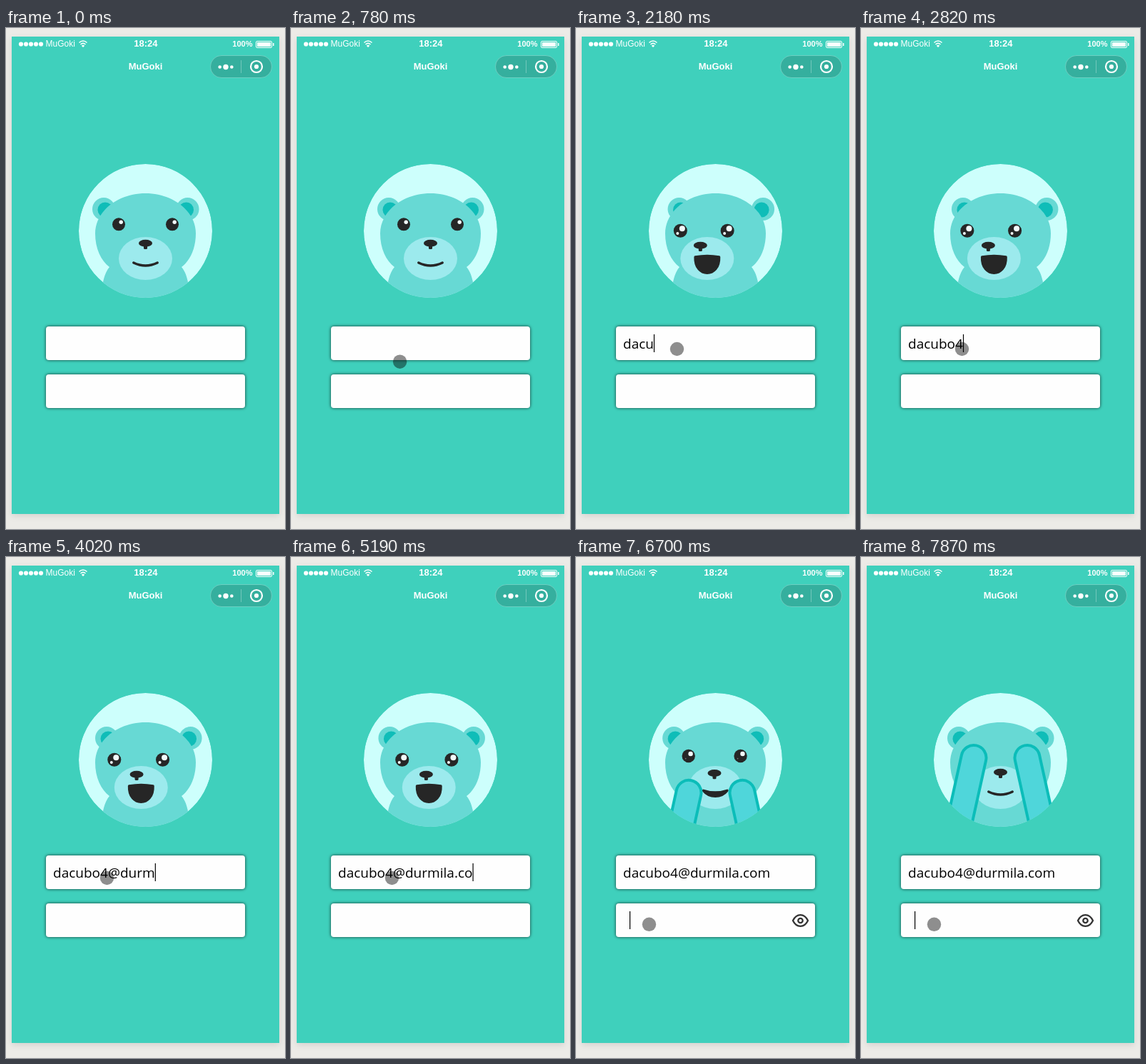
An HTML page for the animation above (8000 ms loop, 391x700 px).

```html
<!DOCTYPE html>
<html lang="en">
<head>
<meta charset="utf-8">
<title>Bear login</title>
<style>
  html, body { margin: 0; width: 100%; height: 100%; overflow: hidden; background: #ecebe7; }
  svg { display: block; width: 391px; height: 700px; }
  .phone { fill: #3fd0bc; filter: drop-shadow(0 3px 4px rgba(0, 0, 0, .1)); }
  .bar { fill: #fff; font: 12px "Liberation Sans", Arial, sans-serif; }
  .bold { font-weight: bold; }
  .line { fill: none; stroke: #fff; }
  .field { fill: #fefefe; filter: drop-shadow(0 0 2px rgba(0, 0, 0, .75)); }
  .fur { fill: #67d9d4; }
  .inner { fill: #0fbdb8; }
  .dark { fill: #262626; }
  .arm { fill: #4fd6da; stroke: #0bbdb9; stroke-width: 4; }
  .icon { fill: none; stroke: #333; stroke-width: 2.3; }
  #email { font: 19px "Open Sans", "Noto Sans", sans-serif; fill: #000; }
</style>
</head>
<body>
<svg viewBox="0 0 391 700">
  <defs>
    <clipPath id="badge"><circle cx="195.5" cy="283.5" r="93.5"/></clipPath>
    <g id="ear">
      <circle class="fur" cx="137" cy="253" r="16"/>
      <circle class="inner" cx="139" cy="254" r="10.5"/>
    </g>
    <rect id="arm" class="arm" x="-17.5" y="-17.5" width="35" height="190" rx="17.5"
          transform="translate(158 280.5) rotate(12.5)"/>
  </defs>

  <rect class="phone" x="8" y="12" width="375" height="667"/>

  <g class="bar">
    <g id="signal"></g>
    <text x="55.5" y="26">MuGoki</text>
    <g class="line" stroke-width="1.5">
      <path d="M102.500 20.500Q108 15.500 113.500 20.500M104.500 23Q108 19.800 111.500 23"/>
    </g>
    <path d="M105.800 24.700Q108 22.800 110.200 24.700L108 27Z"/>
    <text class="bold" x="195.800" y="26" font-size="13" text-anchor="middle">18:24</text>
    <text class="bold" x="317.300" y="26" font-size="11">100%</text>
    <rect class="line" x="350.500" y="18.500" width="22" height="9" rx="1.500"/>
    <rect x="352" y="20" width="19" height="6"/>
    <rect x="374" y="21" width="1.500" height="4"/>
    <text class="bold" x="195.500" y="58" font-size="13" text-anchor="middle">MuGoki</text>
    <rect x="286.500" y="38.500" width="86" height="31" rx="15.500"
          fill="#000" fill-opacity=".16" stroke="#fff" stroke-opacity=".25"/>
    <path d="M329.500 45V63" stroke="#fff" stroke-opacity=".3"/>
    <circle cx="299.700" cy="54.500" r="2.300"/>
    <circle cx="308" cy="54.500" r="3.700"/>
    <circle cx="316.300" cy="54.500" r="2.300"/>
    <circle class="line" cx="351" cy="54" r="8" stroke-width="2.200"/>
    <circle cx="351" cy="54" r="3.100"/>
  </g>

  <g clip-path="url(#badge)">
    <circle cx="195.500" cy="283.500" r="93.500" fill="#cdfffc"/>
    <g id="ears">
      <use href="#ear"/>
      <use href="#ear" transform="translate(391.500) scale(-1 1)"/>
    </g>
    <path class="fur" d="M195.500 231C234 231 266 256 266 287C266 308 258 325 246 334
      C253 342 257 357 257 378H134C134 357 138 342 145 334C133 325 125 308 125 287C125 256 157 231 195.500 231Z"/>
    <ellipse id="muzzle" cx="195.500" cy="322" rx="37.500" ry="30" fill="#9ceaed"/>
    <g id="eyeL"></g>
    <g id="eyeR"></g>
    <g id="nose" class="dark">
      <ellipse cx="195.500" cy="300.800" rx="9.500" ry="5"/>
      <rect x="193" y="303" width="5" height="6" rx="1.500"/>
    </g>
    <path id="mouth" class="dark" stroke="#262626" stroke-width="3.500" stroke-linejoin="round"/>
    <g id="arms">
      <use href="#arm"/>
      <use href="#arm" transform="translate(391) scale(-1 1)"/>
    </g>
  </g>

  <rect class="field" x="56" y="417" width="279" height="47" rx="4"/>
  <rect class="field" x="56" y="484" width="279" height="47" rx="4"/>
  <text id="email" x="66" y="448"></text>
  <rect id="caret" width="1.200" height="25"/>
  <g id="reveal" class="icon">
    <path d="M304 508C309 497.500 320 497.500 325 508C320 518.500 309 518.500 304 508Z" stroke-linejoin="round"/>
    <circle cx="314.500" cy="508" r="3.200"/>
  </g>
  <circle id="touch" r="9.700" fill="#000" fill-opacity=".44"/>
</svg>

<script>
const LOOP = 8000, FOCUS = 920, LEAVE = 6520, BLINK = 530;
const ADDRESS = "dacubo4@durmila.com";
const keyTimes = [1620, 1780, 1930, 2070, 2200, 2340, 2500, 3150, 3380, 3560,
                  3750, 3970, 4180, 4340, 4520, 4860, 5020, 5160, 5330];

const $ = id => document.getElementById(id);
const set = (node, attrs) => { for (const k in attrs) node.setAttribute(k, attrs[k]); };
const shift = (id, x, y = 0) => set($(id), { transform: `translate(${x} ${y})` });
const mix = (a, b, k) => a + (b - a) * k;
const progress = (t, start, length) => Math.min(1, Math.max(0, (t - start) / length));
const easeOut = k => 1 - (1 - k) ** 2;
const easeInOut = k => k * k * (3 - 2 * k);
const tween = (t, start, length = 500) => easeOut(progress(t, start, length));

function addCircle(parent, attrs) {
  const node = document.createElementNS("http://www.w3.org/2000/svg", "circle");
  set(node, attrs);
  return parent.appendChild(node);
}

for (let i = 0; i < 5; i++) addCircle($("signal"), { cx: 21 + 7 * i, cy: 22.5, r: 3.1 });

const eyes = ["eyeL", "eyeR"].map(id => ({
  ball: addCircle($(id), { class: "dark" }),
  shine: addCircle($(id), { fill: "#f2fbfb" }),
  glint: addCircle($(id), { fill: "#f2fbfb", cx: -4, cy: 3.7 })
}));

function drawMouth(x, open, wide) {
  const top = 328 - .5 * open - 7.5 * wide;
  const lip = 336 - 10 * open - 9 * wide;
  const low = 333.3 + 13.9 * open + 2.5 * wide;
  const bend = 5.7 + 9.8 * open + 2.5 * wide;
  const half = 16.7, cx = 195.5 + x;
  set($("mouth"), {
    d: `M${cx - half} ${top}Q${cx} ${lip} ${cx + half} ${top}` +
       `C${cx + bend} ${low} ${cx - bend} ${low} ${cx - half} ${top}Z`
  });
}

function drawBear(t) {
  const look = tween(t, FOCUS) * (1 - tween(t, LEAVE));
  const big = tween(t, keyTimes[0]) * (1 - tween(t, LEAVE));
  const closing = (1 - tween(t, LEAVE, 450)) ** 1.5;
  const turn = keyTimes.reduce((sum, at) => sum + .7 * tween(t, at, 400), -14);

  shift("ears", -.65 * turn * look);
  shift("muzzle", turn * look);
  shift("nose", (1.6 * turn - 2.5) * look, 3 * look);
  shift("eyeL", 158 + turn * look, 274.3 + 9 * look);
  shift("eyeR", 233 + (1.36 * turn - 5) * look, 274.3 + 9 * look);
  for (const { ball, shine, glint } of eyes) {
    set(ball, { r: mix(9, 9.5, big) });
    set(shine, { cx: mix(3.2, 2.5, big), cy: -3, r: mix(2.7, 4, big) });
    set(glint, { r: 2 * big, opacity: big });
  }
  drawMouth(turn * look, tween(t, FOCUS) * closing, tween(t, keyTimes[0]) * closing);
  shift("arms", 0, 120 * (1 - tween(t, LEAVE)));
}

function drawForm(t) {
  const typed = keyTimes.filter(at => at <= t).length;
  const onPassword = t >= LEAVE - 20;
  const email = $("email");
  email.textContent = ADDRESS.slice(0, typed);

  const since = onPassword ? LEAVE - 20 : typed ? keyTimes[typed - 1] : FOCUS;
  const lit = t >= FOCUS && (t - since) % (2 * BLINK) < BLINK;
  set($("caret"), {
    x: onPassword ? 75 : 66 + (typed ? email.getComputedTextLength() : 0),
    y: onPassword ? 495 : 428,
    opacity: +lit
  });
  set($("reveal"), { opacity: +(t >= LEAVE) });
}

function drawTouch(t) {
  const enter = easeInOut(progress(t, 150, 750));
  const move = easeInOut(progress(t, 5700, 690));
  set($("touch"), {
    cx: mix(mix(306, 141.5, enter), 102.5, move),
    cy: mix(mix(711, 448.5, enter), 513.3, move)
  });
}

function draw(now) {
  const t = now % LOOP;
  drawBear(t);
  drawForm(t);
  drawTouch(t);
}

const begin = performance.now();
function tick() {
  draw(performance.now() - begin);
  requestAnimationFrame(tick);
}
tick();
</script>
</body>
</html>
```
